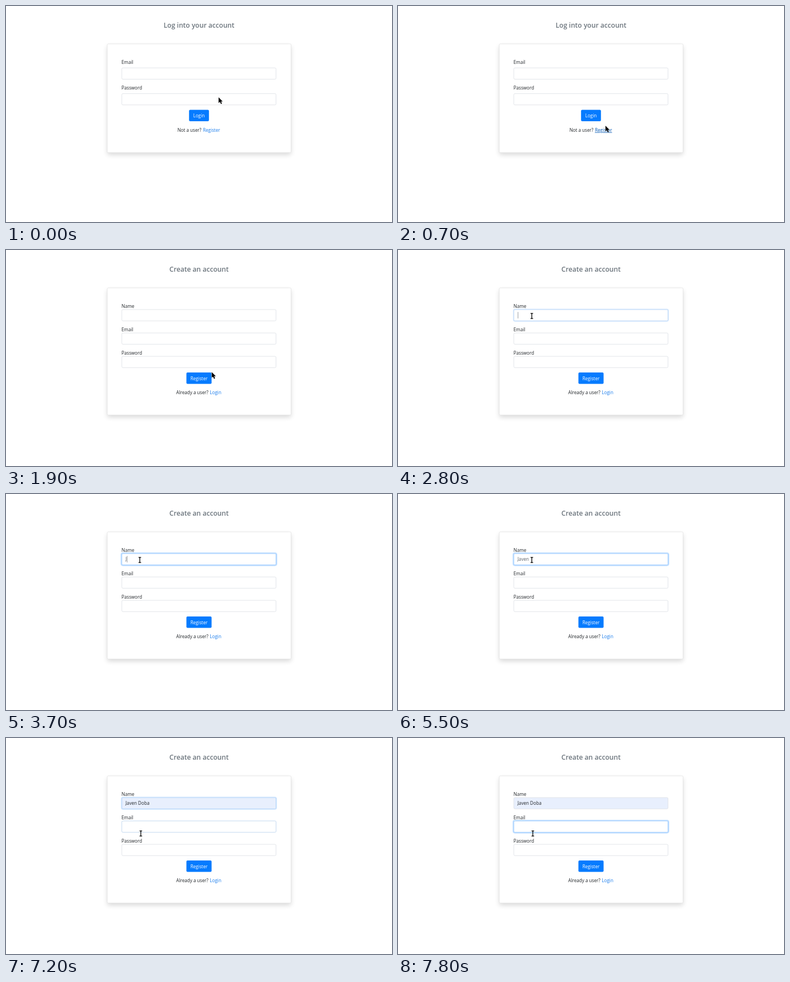
An HTML page that plays this animation: 690 by 388 pixels, repeating every 8 s.

```html
<!DOCTYPE html>
<html lang="en">
<head>
<meta charset="utf-8">
<title>Account form</title>
<style>
  html, body { margin: 0; width: 100%; height: 100%; overflow: hidden; background: #fff; }
  svg { display: block; width: 100%; height: 100%; }
  text { font: 8.15px "Open Sans", "Noto Sans", sans-serif; fill: #212529; white-space: pre; }
  .title { font-size: 12.1px; font-weight: 600; fill: #6c757d; text-anchor: middle; }
  .btn { fill: #fff; text-anchor: middle; }
  .link { fill: #1a7cec; }
  .link.hover { fill: #0056b3; text-decoration: underline; }
  .preview { font: 7.2px "Liberation Sans", Arial, sans-serif; }
</style>
</head>
<body>
<svg id="stage" viewBox="0 0 690 388">
  <defs>
    <filter id="blur" x="-10%" y="-15%" width="120%" height="130%">
      <feGaussianBlur stdDeviation="4"/>
    </filter>
  </defs>
</svg>
<script>
const LOOP = 8000;
const STEP = 100;
const NAME = "Javen Doba";
const KEY_TIMES = [3700, 4500, 4700, 4900, 5000];
const CARET_ON = [[2700, 3300], [3700, 4300], [4500, 5500], [6000, 6300], [7300, 7800]];
const PREVIEW_AT = 6300, FILL_AT = 6700, PAGE_AT = 1900, EMAIL_AT = 7200;

const stage = document.getElementById("stage");

function add(parent, tag, attrs, text) {
  const el = document.createElementNS("http://www.w3.org/2000/svg", tag);
  set(el, attrs);
  if (text) el.textContent = text;
  parent.appendChild(el);
  return el;
}

function set(el, attrs) {
  for (const key in attrs) el.setAttribute(key, attrs[key]);
}

function show(el, on) {
  el.setAttribute("visibility", on ? "visible" : "hidden");
}

function addField(page, label, labelY, y) {
  add(page, "text", { x: 206.6, y: labelY }, label);
  const ring = add(page, "rect", { fill: "none", stroke: "#007bff" });
  const box = add(page, "rect", { x: 207, y, width: 275.7, height: 20.3, rx: 2, fill: "#fff", stroke: "#dfe3e7", "stroke-width": .9 });
  return { ring, box, y };
}

function addPage({ title, bottom, fields, button, buttonY, buttonW, ask, askX, link, linkX, linkY }) {
  const page = add(stage, "g", {});
  const card = { x: 181, y: 68, width: 328.5, height: bottom - 68, rx: 2 };
  add(page, "text", { class: "title", x: 345, y: 38.5 }, title);
  add(page, "rect", { ...card, y: 72, fill: "#000", opacity: .15, filter: "url(#blur)" });
  add(page, "rect", { ...card, fill: "#fff", stroke: "#e3e3e3", "stroke-width": .8 });
  const inputs = fields.map(f => addField(page, ...f));
  add(page, "rect", { x: 345 - buttonW / 2, y: buttonY, width: buttonW, height: 20.6, rx: 2, fill: "#067bfe" });
  add(page, "text", { class: "btn", x: 345, y: buttonY + 13.6 }, button);
  add(page, "text", { x: askX, y: linkY }, ask);
  const anchor = add(page, "text", { class: "link", x: linkX, y: linkY }, link);
  return { page, inputs, anchor };
}

const login = addPage({
  title: "Log into your account", bottom: 263.3,
  fields: [["Email", 103.8, 111.2], ["Password", 150.2, 157.4]],
  button: "Login", buttonY: 186.5, buttonW: 35.6,
  ask: "Not a user?", askX: 306.4, link: "Register", linkX: 351.9, linkY: 225.8
});

const signup = addPage({
  title: "Create an account", bottom: 296.4,
  fields: [["Name", 103.8, 107], ["Email", 145.9, 149], ["Password", 187.9, 191]],
  button: "Register", buttonY: 220, buttonW: 45,
  ask: "Already a user?", askX: 304.3, link: "Login", linkX: 364.3, linkY: 259
});

const [nameField, emailField] = signup.inputs;
const typed = add(signup.page, "text", { x: 213.7, y: 120.2 });
const preview = add(signup.page, "text", { class: "preview", x: 213.4, y: 120.2 }, NAME);
const caret = add(signup.page, "rect", { width: .8, height: 11.6, fill: "#858a90" });

const arrow = add(stage, "path", {
  d: "M0 0V10.2L2.4 8.1L4.2 12.1L6 11.3L4.3 7.4H7.3Z",
  fill: "#000", stroke: "#fff", "stroke-width": .8, "paint-order": "stroke"
});
const beam = add(stage, "path", {
  d: "M-2.3 -4.7H-.5L0 -4.3L.5 -4.7H2.3M0 -4.3V4.3M-2.3 4.7H-.5L0 4.3L.5 4.7H2.3",
  fill: "none", stroke: "#000", "stroke-width": 1.3
});

const clamp = v => Math.max(0, Math.min(1, v));
const mix = (a, b, p) => a + (b - a) * p;
const easeOut = p => 1 - (1 - p) * (1 - p);
const smooth = p => p * p * (3 - 2 * p);

// Reaches 1 on the last of n equal steps that begin at start.
const steps = (t, start, n) => clamp((t - start + STEP) / (n * STEP));

function pointer(t) {
  if (t < 2200) {
    const p = smooth(steps(t, 300, 6)), q = 1 - p;
    return [q * q * 380 + 2 * q * p * 390 + p * p * 367.7, q * q * 164 + 2 * q * p * 190 + p * p * 219.3];
  }
  if (t < 6100) {
    const p = easeOut(steps(t, 2200, 3));
    return [mix(367.7, 239.2, p), mix(219.3, 118.5, p)];
  }
  if (t < 6900) {
    const p = steps(t, 6100, 4);
    return [mix(239.2, 234.7, p), mix(118.5, 138, p)];
  }
  const p = steps(t, 6900, 2);
  return [mix(234.7, 241, p), mix(138, 171.5, p)];
}

function mixColor(a, b, p) {
  return "rgb(" + a.map((v, i) => Math.round(mix(v, b[i], p))) + ")";
}

function focus({ ring, box, y }, p) {
  const grow = .4 + p * .85;
  set(ring, {
    x: 207 - grow, y: y - grow, width: 275.7 + 2 * grow, height: 20.3 + 2 * grow,
    rx: 2 + grow, "stroke-width": 1.7 * p, "stroke-opacity": .25 * p
  });
  box.setAttribute("stroke", mixColor([223, 227, 231], [140, 194, 255], p));
}

function draw(time) {
  const t = Math.floor(time / STEP) * STEP;
  const onSignup = t >= PAGE_AT;
  login.page.setAttribute("display", onSignup ? "none" : "inline");
  signup.page.setAttribute("display", onSignup ? "inline" : "none");
  login.anchor.classList.toggle("hover", t >= 700);

  const emailFocus = steps(t, EMAIL_AT, 3);
  const rise = steps(t, 2600, 4);
  focus(nameField, Math.pow(rise, 1.8) * (1 - emailFocus));
  focus(emailField, emailFocus);

  const filled = t >= FILL_AT, previewing = t >= PREVIEW_AT && !filled;
  const count = KEY_TIMES.filter(k => t >= k).length;
  typed.textContent = filled ? NAME : NAME.slice(0, count);
  typed.style.fill = filled ? "#212529" : "#596068";
  typed.setAttribute("display", previewing ? "none" : "inline");
  preview.setAttribute("display", previewing ? "inline" : "none");
  nameField.box.setAttribute("fill", t >= PREVIEW_AT ? "#e8effd" : "#fff");

  const inEmail = t >= EMAIL_AT;
  const offset = !inEmail && count ? typed.getComputedTextLength() : 0;
  set(caret, { x: 214 + offset, y: inEmail ? 153.3 : 111.3 });
  show(caret, CARET_ON.some(([a, b]) => t >= a && t < b));

  const [x, y] = pointer(t);
  const overInput = (t >= 2400 && t < PREVIEW_AT) || t >= 6900;
  show(arrow, !overInput);
  show(beam, overInput);
  set(overInput ? beam : arrow, { transform: `translate(${x} ${y})` });
}

const began = performance.now();
function tick() {
  draw((performance.now() - began) % LOOP);
  requestAnimationFrame(tick);
}
tick();
</script>
</body>
</html>
```
